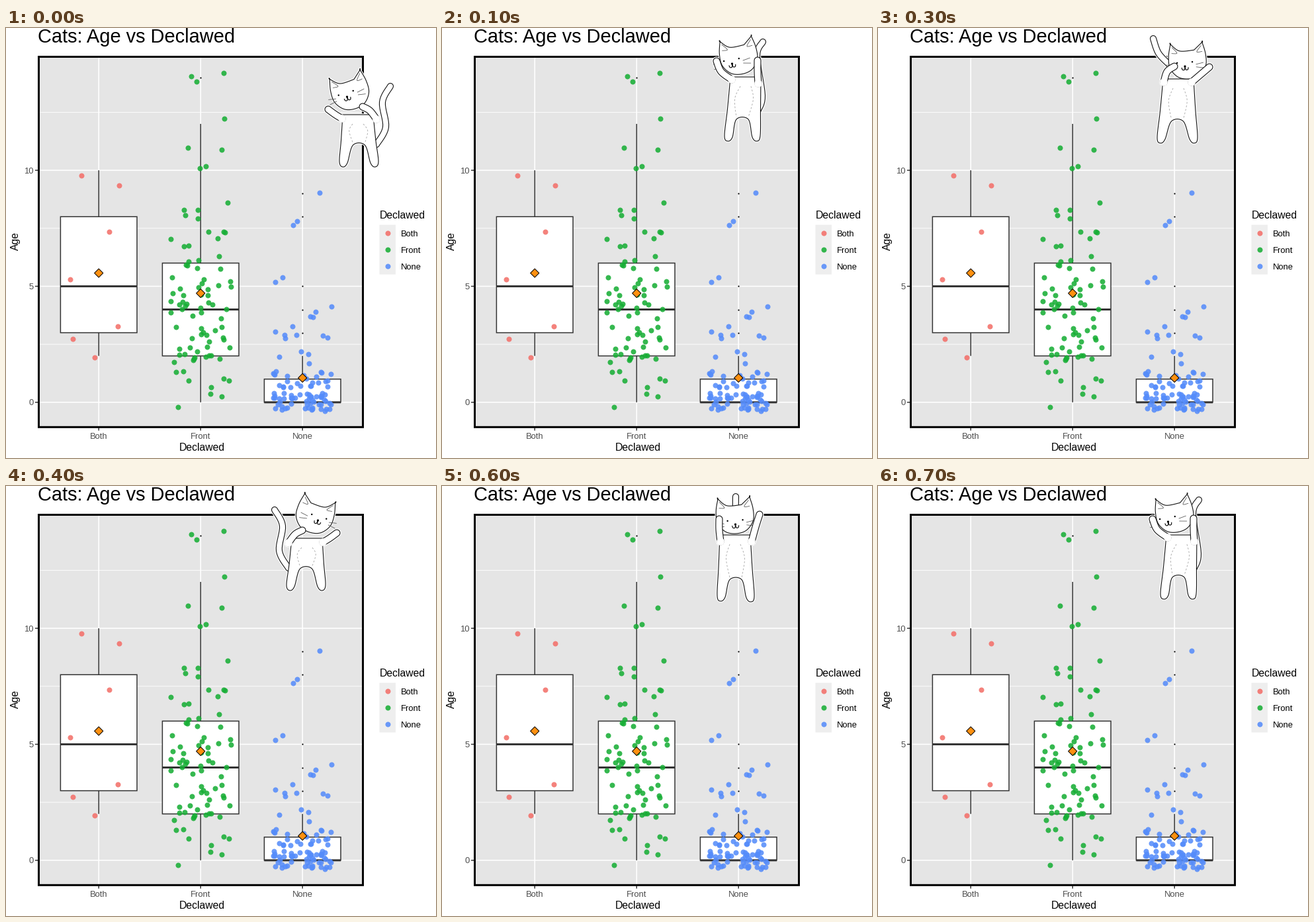
Write a matplotlib script that moves like this. It is 650x650 px and loops after 0.8 s.

```python
import numpy as np
import matplotlib.pyplot as plt
from matplotlib.animation import FuncAnimation
from matplotlib.patches import Circle, Polygon, Rectangle

SIZE, DPI = 650, 100
PX = 72 / DPI
plt.rcParams.update({"font.family": "Liberation Sans", "path.snap": False})

fig = plt.figure(figsize=(SIZE / DPI, SIZE / DPI), dpi=DPI, facecolor="white")
ax = fig.add_axes([0, 0, 1, 1])
ax.set(xlim=(0, SIZE), ylim=(SIZE, 0))
ax.axis("off")

INK, GREY = "#333333", "#4d4d4d"
CENTERS = {"Both": 140.2, "Front": 294.2, "None": 448.2}
COLORS = {"Both": "#f36f69", "Front": "#17ae35", "None": "#558cfa"}
PANEL = (49.5, 43.5, 539.5, 603.3)

# Stray points as (x offset from the box centre, age).
STRAYS = {
    "Both": [(-26, 9.77), (31, 9.34), (16, 7.35), (-43, 5.3), (29, 3.26),
             (-39, 2.73), (-6, 1.94)],
    "Front": [(-14, 14.05), (-6, 13.83), (35, 14.2), (36, 12.24), (-19, 10.97),
              (32, 10.88), (8, 10.18), (-1, 10.1), (41, 8.61), (-25, 8.3),
              (-4, 8.3), (-23, 8.06), (-4, 7.92)],
    "None": [(26, 9.03), (-8, 7.81), (-14, 7.64), (-30, 5.37), (-41, 5.17)],
}
# How many cats of each whole age crowd the lower part of each group.
CROWDS = {
    "Both": {},
    "Front": {7: 7, 6: 7, 5: 13, 4: 14, 3: 11, 2: 15, 1: 6, 0: 3},
    "None": {4: 4, 3: 7, 2: 4, 1: 25, 0: 52},
}


def age_y(age):
    return 565.8 - 35.07 * age


def line(xs, ys, color, width, z=1):
    ax.plot(xs, ys, color=color, lw=width * PX, zorder=z, solid_capstyle="butt")


def rect(x0, y0, x1, y1, face, edge="none", width=0, z=1):
    ax.add_patch(Rectangle((x0, y0), x1 - x0, y1 - y0, fc=face, ec=edge,
                           lw=width * PX, zorder=z))


def label(x, y, text, px, color="black", **kw):
    ax.text(x, y, text, fontsize=px * PX, color=color,
            **{"va": "baseline", "ha": "left", **kw})


def dots(x, y, color, alpha=0.87, radius=4.0):
    ax.scatter(x, y, s=(2 * radius * PX) ** 2, c=color, alpha=alpha,
               linewidths=0, zorder=3)


def box(x, low, q1, median, q3, high, mean, outliers=()):
    for ends in ((low, q1), (q3, high)):
        line([x, x], [age_y(a) for a in ends], INK, 1.5, 2)
    rect(x - 57.8, age_y(q3), x + 57.8, age_y(q1), "white", INK, 1.5, 2)
    line([x - 57.8, x + 57.8], [age_y(median)] * 2, INK, 3, 2.1)
    for age in outliers:
        dots([x], [age_y(age)], "black", 1, 1.1)
    y, r = age_y(mean), 6.6
    ax.add_patch(Polygon([(x - r, y), (x, y - r), (x + r, y), (x, y + r)],
                         fc="#ff9010", ec="black", lw=PX, zorder=4))


def jittered(name, rng):
    ages = np.repeat(list(CROWDS[name]), list(CROWDS[name].values()))
    crowd = np.column_stack([rng.uniform(-46, 46, len(ages)),
                             ages + rng.uniform(-0.4, 0.4, len(ages))])
    points = np.vstack([STRAYS[name], crowd])
    return CENTERS[name] + points[:, 0], age_y(points[:, 1])


def draw_chart():
    left, top, right, bottom = PANEL
    rect(*PANEL, "#e5e5e5", z=0)
    for age in (2.5, 7.5, 12.5):
        line([left, right], [age_y(age)] * 2, "white", 0.9)
    for age in (0, 5, 10):
        y = age_y(age)
        line([left, right], [y, y], "white", 1.6)
        line([44, left], [y, y], INK, 1.5)
        label(41.5, y + 4.7, str(age), 13, GREY, ha="right")
    rect(*PANEL, "none", "black", 3, 5)
    label(564.5, 288, "Declawed", 15.8)
    rect(564.5, 297.5, 589, 372.5, "#eeeeee")

    rng = np.random.default_rng(7)
    for i, (name, x) in enumerate(CENTERS.items()):
        line([x, x], [top, bottom], "white", 1.6)
        line([x, x], [bottom, 608.5], INK, 1.5)
        label(x, 621, name, 13, GREY, ha="center")
        dots(*jittered(name, rng), COLORS[name])
        y = 310 + 25 * i
        dots([576.8], [y], COLORS[name])
        label(597, y + 4.8, name, 13)

    box(CENTERS["Both"], 2, 3, 5, 8, 10, 5.57)
    box(CENTERS["Front"], 0, 2, 4, 6, 12, 4.7, [14])
    box(CENTERS["None"], 0, 0, 0, 1, 2, 1.05, [3, 4, 5, 8, 9])

    label(48, 22, "Cats: Age vs Declawed", 29)
    label(296, 639, "Declawed", 15.8, ha="center")
    label(14, 321.5, "Age", 15.8, rotation=90, ha="center", va="center")


# Each pose holds only joints; the outlines are built around them.
SWAY = dict(head=(521, 99), tilt=17, nose=(515.5, 104), neck=(532, 131),
            feet=[(509, 210), (558, 210)],
            tail=[(560, 176), (574, 150), (569, 112), (581, 88)],
            arms=[[(508, 137), (498, 131), (487, 123)],
                  [(560, 138), (550, 125), (539, 119)]])
WAVE = dict(head=(449, 46), tilt=10, nose=(438.5, 54), neck=(459, 74),
            feet=[(432, 171), (476, 171)],
            tail=[(478, 124), (484, 102), (476, 42), (485, 21)],
            arms=[[(438, 78), (422, 66), (415, 50)],
                  [(478, 84), (477, 66), (477, 49)]])
REACH = dict(head=(443, 48), tilt=4, nose=(443.5, 58), neck=(443, 74),
             feet=[(421, 174), (467, 175)],
             tail=[(446, 60), (444, 32), (444, 16)],
             arms=[[(421, 84), (419, 66), (419, 50)],
                   [(468, 84), (474, 62), (480, 43)]])
TWIST = dict(head=(468, 53), tilt=4, nose=(464, 58), neck=(454, 77),
             feet=[(427, 174), (478, 174)],
             tail=[(440, 55), (424, 38), (416, 16)],
             arms=[[(432, 82), (437, 66), (448, 58)],
                   [(474, 82), (488, 70), (501, 59)]])
COUNTER_SWAY = dict(SWAY, mirror=(493.5, -52))
DANCE = [SWAY, WAVE, REACH, TWIST, COUNTER_SWAY, TWIST, REACH, WAVE]

# Right half of the head from forehead to chin; a doubled point is a corner.
HALF_HEAD = np.array([(11, -19), (24, -30), (24, -30), (28, -12), (27, 6),
                      (16, 20)])
FLIP = np.array([-1, 1])
cat_artists = []


def smooth(points, steps=8):
    """Catmull-Rom curve through the points."""
    p = np.array([points[0], *points, points[-1]], float)
    t = np.linspace(0, 1, steps, endpoint=False)[:, None]
    parts = [b + 0.5 * t * (c - a + t * (2 * a - 5 * b + 4 * c - d
                                         + t * (3 * (b - c) + d - a)))
             for a, b, c, d in zip(p, p[1:], p[2:], p[3:])]
    return np.vstack(parts + [p[-1:]])


def body_outline(neck, feet):
    neck, (left, right) = np.array(neck), np.array(feet)
    hip = (left + right) / 2 - (0, 33)

    def side(foot, s):
        return [neck + (23 * s, 0), (neck + foot) / 2 + (14 * s, 0),
                foot + (5 * s, -8), foot, foot + (-7 * s, -6), hip + (9 * s, 0)]
    return smooth(side(left, -1) + side(right, 1)[::-1])


def draw_cat(pose):
    axis, lift = pose.get("mirror", (None, 0))
    angle = np.radians(pose["tilt"])
    turn = np.array([[np.cos(angle), -np.sin(angle)],
                     [np.sin(angle), np.cos(angle)]])

    def place(points):
        p = np.array(points, float)
        return p if axis is None else p * FLIP + (2 * axis, lift)

    def curve(points, color, width, z, **kw):
        x, y = place(smooth(points)).T
        cat_artists.extend(ax.plot(x, y, color=color, lw=width * PX, zorder=z,
                                   solid_capstyle="round", **kw))

    def spot(center, radius, color, z):
        cat_artists.append(ax.add_patch(Circle(place(center), radius, fc=color,
                                               lw=0, zorder=z)))

    def blob(outline, z):
        for edge, width, layer in (("white", 3.6, 6), ("#111111", 1.1, z)):
            cat_artists.append(ax.add_patch(Polygon(
                place(outline), fc="white", ec=edge, lw=width * PX,
                zorder=layer, joinstyle="round")))

    def limb(points, width, z):
        for color, extra, layer in (("white", 3.6, 6), ("#111111", 1.1, z),
                                    ("white", -1.1, z + 0.1)):
            curve(points, color, width + extra, layer)

    def on_head(points, origin=pose["head"]):
        return np.array(points) @ turn + origin

    limb(pose["tail"], 9, 7)
    blob(body_outline(pose["neck"], pose["feet"]), 7.2)
    half = HALF_HEAD
    head = np.vstack([half, (0, 24), half[::-1] * FLIP, half[:1]])
    blob(on_head(smooth(head)), 7.4)
    for arm in pose["arms"]:
        limb(arm, 10, 7.6)
        spot(arm[0], 5.8, "white", 7.8)

    neck, hip = np.array(pose["neck"]), np.mean(pose["feet"], axis=0) - (0, 36)
    nose = pose["nose"]
    spot(nose, 1.6, "black", 8)
    for s in (-1, 1):
        def sided(points):
            return np.array(points) * (s, 1)
        curve([neck + (8 * s, 14), (neck + hip) / 2 + (14 * s, 3),
               hip + (9 * s, 0)], "#aaaaaa", 0.9, 8, ls=(0, (3, 3)))
        curve(on_head(sided([(22, -25), (15, -16), (23, -16)])), "#555555", 0.8, 8)
        for drop in (-2, 2):
            curve(on_head(sided([(17, drop), (28, 2 * drop)]), nose),
                  "#555555", 0.8, 7.5)
        curve(on_head(sided([(0, 0), (1, 5), (4, 5), (5, 2)]), nose),
              "black", 1.1, 8)
        spot(on_head([11.5 * s, -6], nose), 1.2, "black", 8)


def update(i):
    while cat_artists:
        cat_artists.pop().remove()
    draw_cat(DANCE[i % len(DANCE)])
    return cat_artists


draw_chart()
anim = FuncAnimation(fig, update, frames=len(DANCE), interval=100,
                     repeat=True, repeat_delay=0, blit=False)
plt.show()
```
